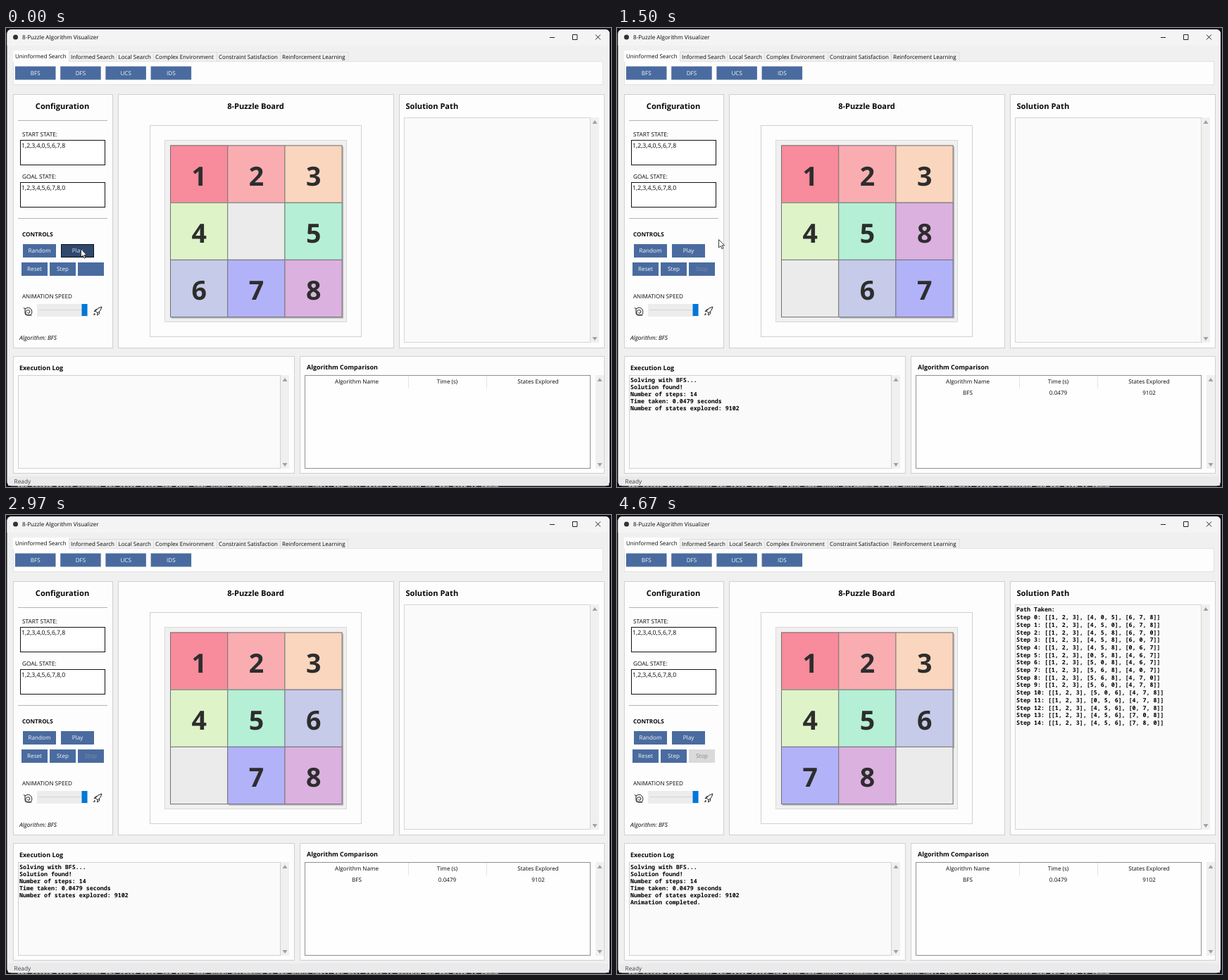
An HTML page with a canvas for the animation above (4700 ms loop, 859 px wide and 652 px high).

```html
<!DOCTYPE html>
<html lang="en">
<head>
<meta charset="utf-8">
<title>8-Puzzle Algorithm Visualizer</title>
<style>
html, body { margin: 0; width: 100%; height: 100%; overflow: hidden; background: #11141c; }
canvas { display: block; }
</style>
</head>
<body>
<canvas id="stage" width="859" height="652"></canvas>
<script>
const ctx = document.getElementById('stage').getContext('2d');
ctx.textRendering = 'geometricPrecision';

const LOOP = 4700, FIRST_STEP = 585, STEP = 196;
const RELEASED = 150, SOLVED = 250, CURSOR_GONE = 1800;
const SANS = '"Open Sans", "Noto Sans", sans-serif';
const MONO = '"Noto Sans Mono", "DejaVu Sans Mono", monospace';
const INK = '#080808', BLUE = '#4a6b9f', PANEL = '#fdfdfd', GREY = '#f0f0f0';
const TEXT_AREA = '#f9faf9', EDGE = '#d0d0d5';
const TILES = ['#ebebeb', '#f88b9c', '#f9adb1', '#fad6be', '#dff3c8',
               '#b5efd6', '#c5cbe8', '#b2b2f9', '#dbb1e0'];

// Each state follows from moving the blank to the next cell.
const states = [[1, 2, 3, 4, 0, 5, 6, 7, 8]];
for (const cell of [5, 8, 7, 6, 3, 4, 7, 8, 5, 4, 3, 6, 7, 8]) {
  const next = states.at(-1).slice(), blank = next.indexOf(0);
  [next[blank], next[cell]] = [next[cell], 0];
  states.push(next);
}
const LAST = states.length - 1;
const row = (s, i) => `[${s.slice(i, i + 3).join(', ')}]`;
const pathLines = ['Path Taken:',
  ...states.map((s, i) => `Step ${i}: [${row(s, 0)}, ${row(s, 3)}, ${row(s, 6)}]`)];
const logLines = ['Solving with BFS...', 'Solution found!', `Number of steps: ${LAST}`,
  'Time taken: 0.0479 seconds', 'Number of states explored: 9102', 'Animation completed.'];

function box(x, y, right, bottom, fill, border) {
  ctx.fillStyle = fill;
  ctx.fillRect(x, y, right - x, bottom - y);
  if (border) {
    ctx.strokeStyle = border;
    ctx.lineWidth = 1;
    ctx.strokeRect(x + .5, y + .5, right - x - 1, bottom - y - 1);
  }
}

function roundBox(x, y, right, bottom, radii, fill) {
  ctx.fillStyle = fill;
  ctx.beginPath();
  ctx.roundRect(x, y, right - x, bottom - y, radii);
  ctx.fill();
}

// y is the middle of the capital letters.
function text(str, x, y, { size = 8.1, style = '500', align = 'left', color = INK, font = SANS } = {}) {
  ctx.font = `${style} ${size}px ${font}`;
  ctx.textAlign = align;
  ctx.fillStyle = color;
  ctx.fillText(str, x, y + size * .357);
}

const centered = (str, x, y, opts) => text(str, x, y, { align: 'center', ...opts });
const heading = (str, x, y, size = 11.1, align) => text(str, x, y, { size, style: 'bold', align });
const mono = (str, x, y, color = '#000') => text(str, x, y, { size: 8.32, style: '600', font: MONO, color });

function button(label, x, y, w, fill = BLUE, color = '#f4f7fb', border) {
  box(x, y, x + w, y + 19, fill, border);
  centered(label, x + w / 2, y + 9.6, { color });
}

function stroke(d, color = '#222', width = 1) {
  ctx.strokeStyle = color;
  ctx.lineWidth = width;
  ctx.stroke(new Path2D(d));
}

function scrollbar(x, top, bottom) {
  box(x - 6, top, x + 6, bottom, GREY);
  ctx.fillStyle = '#a0a0a0';
  ctx.fill(new Path2D(`M${x - 3.5} ${top + 9}h7l-3.5-5z M${x - 3.5} ${bottom - 8}h7l-3.5 5z`));
}

function drawWindow() {
  box(0, 0, 859, 652, '#11141c');
  // A line of another window peeks out below.
  mono('the search first expands the start state and then adds every neighbour to the queue until the goal state is reached and the path is shown',
    16, 652.5, '#c8c8c8');
  roundBox(1.5, 2, 857, 650.5, 6, GREY);
  roundBox(1.5, 2, 857, 25, [6, 6, 0, 0], '#f4f4f5');

  ctx.fillStyle = '#333';
  ctx.beginPath();
  ctx.arc(13.5, 13, 3.5, 0, 7);
  ctx.fill();
  text('8-Puzzle Algorithm Visualizer', 23, 13.5);
  stroke('M772 13.5h7 M837 9.5l7 7m0-7l-7 7 M804.5 9.5h6.5v7h-6.5z');
}

function drawTabs() {
  box(10, 47, 848, 81, PANEL, '#e2e2e2');
  const tabs = [['Informed Search', 92], ['Local Search', 159.5], ['Complex Environment', 212],
    ['Constraint Satisfaction', 302], ['Reinforcement Learning', 392]];
  for (const [label, x] of tabs) {
    stroke(`M${x - 2.5} 35v12`, '#dedede');
    text(label, x, 41.3, { size: 8 });
  }
  stroke('M89 34.5h397v12.5', '#dedede');
  box(10, 32, 89, 48, PANEL);
  text('Uninformed Search', 13, 40.2, { size: 8 });
  ['BFS', 'DFS', 'UCS', 'IDS'].forEach((name, i) => button(name, 13 + i * 64.2, 54.5, 57.5));
}

function drawSpeed() {
  text('ANIMATION SPEED', 23, 380.8);
  box(44, 392, 116, 410, '#ececec');
  stroke('M46 400.5h61', '#d4d4d4');
  box(107.5, 392, 115.5, 409, '#0078d7');
  // Snail and rocket.
  stroke('M25 397l2 2v6q0 3 3 3h6.5 M27 399q6-4 9 1q2 5-1 7.5h-5q-3-2-2-5q2-3 5-1.5q2 2 0 4q-2 1-2.5-1');
  stroke('M127 402q3-5 9-6q-1 6-6 9z M127 402l-2 1 2-3 3-.5 M130 405l-.5 3 3-2 .3-3 M126 405l-1.5 2.5 2.5-1');
}

function drawConfig(t, done) {
  box(10, 94, 152, 455, PANEL, EDGE);
  heading('Configuration', 80, 111.5, 11.1, 'center');
  stroke('M17 131.5h127 M17 270.5h127', '#b4b4b4');
  [['START STATE:', states[0], 151], ['GOAL STATE:', states[LAST], 211]].forEach(([label, s, y]) => {
    text(label, 23, y, { size: 8.25 });
    box(20, y + 8, 141, y + 44, '#fff', '#111');
    text(s.join(), 22, y + 16, { size: 8.75 });
  });
  heading('CONTROLS', 23, 293, 8.15);
  button('Random', 24, 307, 47);
  if (t < RELEASED) button('Play', 78, 307, 47, '#2f486e', '#dfe6ef', '#0c1018');
  else button('Play', 78, 307, 47);
  button('Reset', 22, 333, 37);
  button('Step', 62, 333, 37);
  if (done) button('Stop', 102, 333, 37, '#dadada', '#858585');
  else button('Stop', 102, 333, 37, BLUE, t < SOLVED ? '#4f6e9b' : '#808da0');
  drawSpeed();
  text('Algorithm: BFS', 19, 439.7, { size: 8.3, style: 'italic' });
}

function drawBoard(state) {
  box(159, 94, 551, 455, PANEL, EDGE);
  heading('8-Puzzle Board', 354.5, 111.5, 11.1, 'center');
  box(204, 138, 505, 439, PANEL, '#cfcfd8');
  box(225, 159, 484, 418, GREY, '#d9d9d9');
  const side = 81.2, at = i => [233 + i % 3 * side, 166.5 + Math.floor(i / 3) * side];
  state.forEach((n, i) => {
    const [x, y] = at(i);
    if (n) box(x + 2, y + 2, x + side + 2.5, y + side + 2.5, '#b5b5b5');
  });
  state.forEach((n, i) => {
    const [x, y] = at(i);
    box(x, y, x + side + 1, y + side + 1, TILES[n], '#707070');
    if (n) centered(n, x + 41.2, y + 43.9, { size: 37.5, style: 'bold', color: '#2d2d2d' });
  });
}

function drawResults(t, done) {
  box(558, 94, 850, 455, PANEL, EDGE);
  heading('Solution Path', 567.5, 111.5);
  box(565, 127, 830, 447, TEXT_AREA, '#d5d5cf');
  scrollbar(836, 127, 447);
  if (done) pathLines.forEach((line, i) => mono(line, 567, 134.5 + i * 10.7));

  box(10, 466, 410, 633, PANEL, EDGE);
  heading('Execution Log', 19, 482.3, 9);
  box(17, 493, 390, 626, TEXT_AREA, '#d0d0d0');
  scrollbar(396, 493, 626);
  if (t >= SOLVED) logLines.slice(0, done ? 6 : 5).forEach((line, i) => mono(line, 19, 500.5 + i * 10));

  box(417, 466, 850, 633, PANEL, EDGE);
  heading('Algorithm Comparison', 427, 482.3, 8.95);
  box(424, 493, 830, 626, '#fefefe', '#8c9098');
  scrollbar(843, 493, 626);
  stroke('M571.5 494v18 M682.5 494v18', '#e3e3e3');
  [['Algorithm Name', 'BFS', 498], ['Time (s)', '0.0479', 626.5], ['States Explored', '9102', 755.5]]
    .forEach(([title, value, x]) => {
      centered(title, x, 502.6);
      if (t >= SOLVED) centered(value, x, 518.3);
    });

  box(3, 637, 856, 650, '#eaeaea');
  text('Ready', 11.5, 644.5, { size: 8.3, color: '#444' });
}

function drawCursor(t) {
  if (t >= CURSOR_GONE) return;
  const p = Math.min(1, Math.max(0, (t - 150) / 400)), ease = p * p * (3 - 2 * p);
  ctx.save();
  ctx.translate(106.5 + 38 * ease, 314 - 13.5 * ease);
  const arrow = new Path2D('M0 0v11.5l2.7-2.5 1.8 4.2 1.8-.8-1.8-4h3.6z');
  ctx.fillStyle = '#fff';
  ctx.fill(arrow);
  ctx.strokeStyle = '#111';
  ctx.lineWidth = .8;
  ctx.stroke(arrow);
  ctx.restore();
}

function draw(now) {
  const t = now % LOOP;
  const step = Math.min(LAST, Math.max(0, Math.floor((t - FIRST_STEP) / STEP)));
  const done = step === LAST;
  drawWindow();
  drawTabs();
  drawConfig(t, done);
  drawBoard(states[step]);
  drawResults(t, done);
  drawCursor(t);
}

const start = performance.now();
function tick() {
  draw(performance.now() - start);
  requestAnimationFrame(tick);
}
tick();
</script>
</body>
</html>
```
